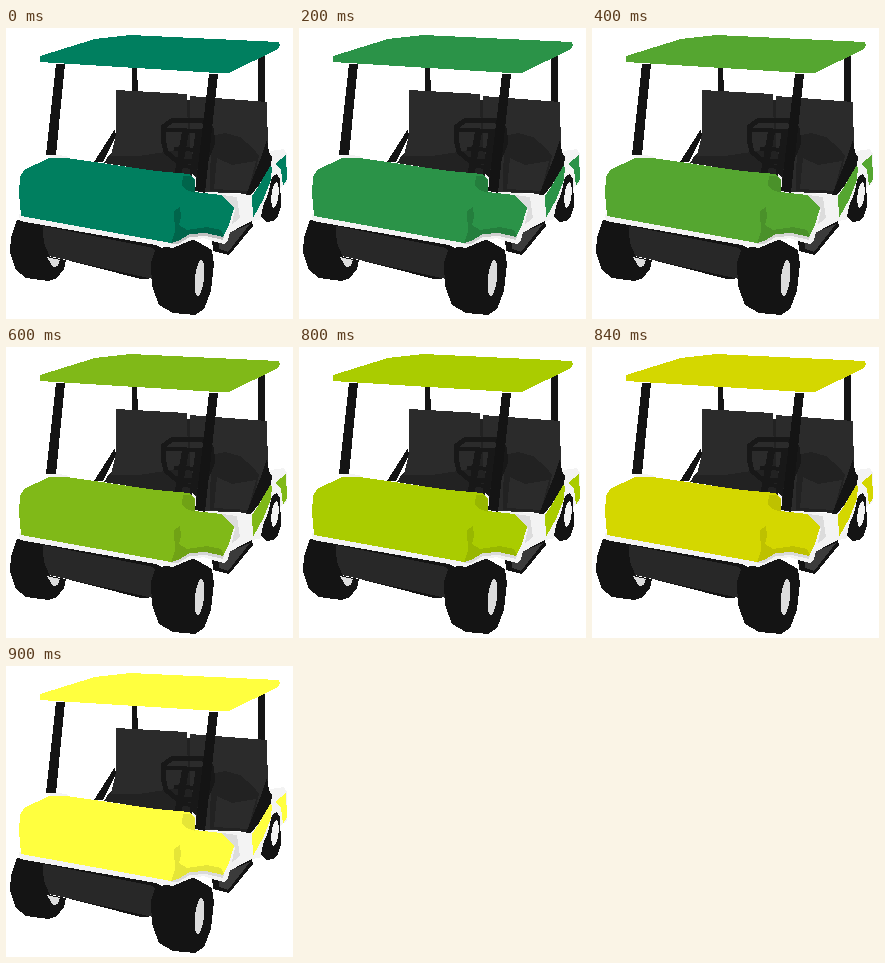
An HTML page for the animation above (0.92 s loop, 287 by 291 pixels).

```html
<!DOCTYPE html>
<html lang="en">
<head>
<meta charset="utf-8">
<title>Golf cart</title>
<style>
html, body { margin: 0; width: 100%; height: 100%; overflow: hidden; background: #fff; }
svg { display: block; width: 100%; height: 100%; color: #007f5f; shape-rendering: crispEdges; }
.paint { fill: currentColor; }
.black { fill: #141414; }
.seat { fill: #2b2b2b; }
.dark { fill: #222; }
.trim { fill: #f3f3f3; }
.grey { fill: #dcdcdc; }
.line { fill: none; stroke: #181818; }
</style>
</head>
<body>
<svg id="cart" viewBox="0 0 287 291" preserveAspectRatio="none">
  <!-- rear posts -->
  <path class="black" d="M126 40h5l1 24h-6zM252 30l7-3v49h-7z"/>

  <!-- rear body and wheel -->
  <path class="black" d="M253 72h6l-1 52h-7z"/>
  <path class="trim" d="M264 123l14-2 3 5v29l-7 5-10 18-10 14-10 1-2-27 14-22z"/>
  <path class="paint" d="M246 168l6-9 12-21 2 1-1 13-8 20-10 18z"/>
  <path class="paint" d="M269 136l11-9 1 24-4 7-2-16z"/>
  <path class="black" d="M266 149l5-3 3 5 1 27-3 10-5 5-7 1-5-5 2-11 5-12z"/>
  <ellipse class="trim" cx="269" cy="167" rx="3.500" ry="13" transform="rotate(6 269 167)"/>

  <!-- seats -->
  <path class="black" d="M109 101l1 7-13 26h-9z"/>
  <path class="dark" d="M103 127l78-55h5l16 93-14-3-2-13-88-14z"/>
  <path class="seat" d="M110 62l71 4 1 45-16 12-33 5-28 0 5-22z"/>
  <path class="seat" d="M184 68l77 6 1 48-16 44-46-2-16-44z"/>
  <path class="dark" d="M205 108l14-3 15 4 14 12 5 7-9 38-40-3z"/>
  <path class="seat" d="M211 130l15 7 24-4-8 30-34-2z"/>
  <path class="black" d="M261 112l2 12 3 5-1 8-12 20-8 10h-5l14-35z"/>

  <!-- floor and side panel -->
  <path class="black" d="M206 210l40-17 1 5-24 29-16-4z"/>
  <path fill="#3b3b3b" d="M213 209l31-13-22 28-9-3z"/>
  <path class="trim" d="M188 163l57 4 1 26-29 15-28-8z"/>
  <path class="grey" d="M216 167l15 2 3 21-10 8z"/>

  <!-- steering wheel -->
  <g class="line">
    <path d="M157 99l10-7h29l9 8 2 14-5 13-13 6h-18l-11-9-3-13z" stroke-width="5"/>
    <path d="M158 102l45 1" stroke-width="4"/>
    <path d="M180 101l-8 45M193 104l-6 44" stroke-width="7"/>
    <path d="M168 121l32 1M172 138l20 1" stroke-width="4"/>
  </g>

  <!-- undercarriage and wheels -->
  <path class="black" d="M34 196l114 20 12 6-10 28-15 1-94-24z"/>
  <path fill="#282828" d="M37 198l110 22 4 5-4 26L43 228l-6-12z"/>
  <path class="black" d="M11 192l25 3 2 20 6 14 16 3-2 9-7 9-8 3-23-3-10-8-6-18 1-15z"/>
  <path class="grey" d="M41 229l13 3-2 6-5 1z"/>
  <path class="black" d="M158 219l27-9 21 12 2 14-3 27-7 18-9 6-22-2-14-8-7-19-1-23 4-13z"/>
  <ellipse class="grey" cx="193.500" cy="250" rx="4.500" ry="18" transform="rotate(6 193 250)"/>

  <!-- hood -->
  <path class="trim" d="M13 186l150 26 12-6 20-3 20 3 11-27 3 3-7 30-4 4-12-3-8-3-12 2-10 4-9 4L14 193z"/>
  <path class="trim" d="M40 129l8-3 16 3-7 2zM186 146l5 5v14l-4-1z"/>
  <path class="paint" d="M18 142l25-12h18l89 13 34 3 5 6v12l26 3 13 13-5 17-6 12-17-4-16 1-12 7-7 2L15 188l-2-23 1-16z"/>
  <g id="shade">
    <path d="M177 148h8l4 5v12l-9-3-4-5z"/>
    <path d="M168 183l6-4 1 10-2 8 8 5 20-3 14 3 3 6-1 4-17-4-16 1-12 7-7 0 4-12z"/>
  </g>

  <!-- front posts -->
  <path class="black" d="M50 36h9l-9 91H40zM203 46h9l-13 119-10-2z"/>

  <!-- roof -->
  <path class="paint" d="M34 28l55-17 35-4 149 7 1 3-2 4-49 24-12 0L34 34z"/>
</svg>
<script>
const LOOP = 920;
// start time, paint colour, depth of the hood shadow
const steps = [
  [0, '#007f5f', .2],
  [200, '#2b9348', .14],
  [400, '#55a630', .12],
  [600, '#80b918', .12],
  [800, '#aacc00', .1],
  [820, '#bfd200', .1],
  [840, '#d4d700', .1],
  [860, '#dddf00', .1],
  [880, '#eeef20', .1],
  [900, '#ffff3f', .1]
];

function play(id, prop, column) {
  const frames = steps.map(s => ({ offset: s[0] / LOOP, [prop]: s[column], easing: 'step-end' }));
  frames.push({ offset: 1, [prop]: steps[steps.length - 1][column] });
  const run = document.getElementById(id).animate(frames, { duration: LOOP, iterations: Infinity });
  run.startTime = 0;
}

play('cart', 'color', 1);
play('shade', 'opacity', 2);
</script>
</body>
</html>
```
